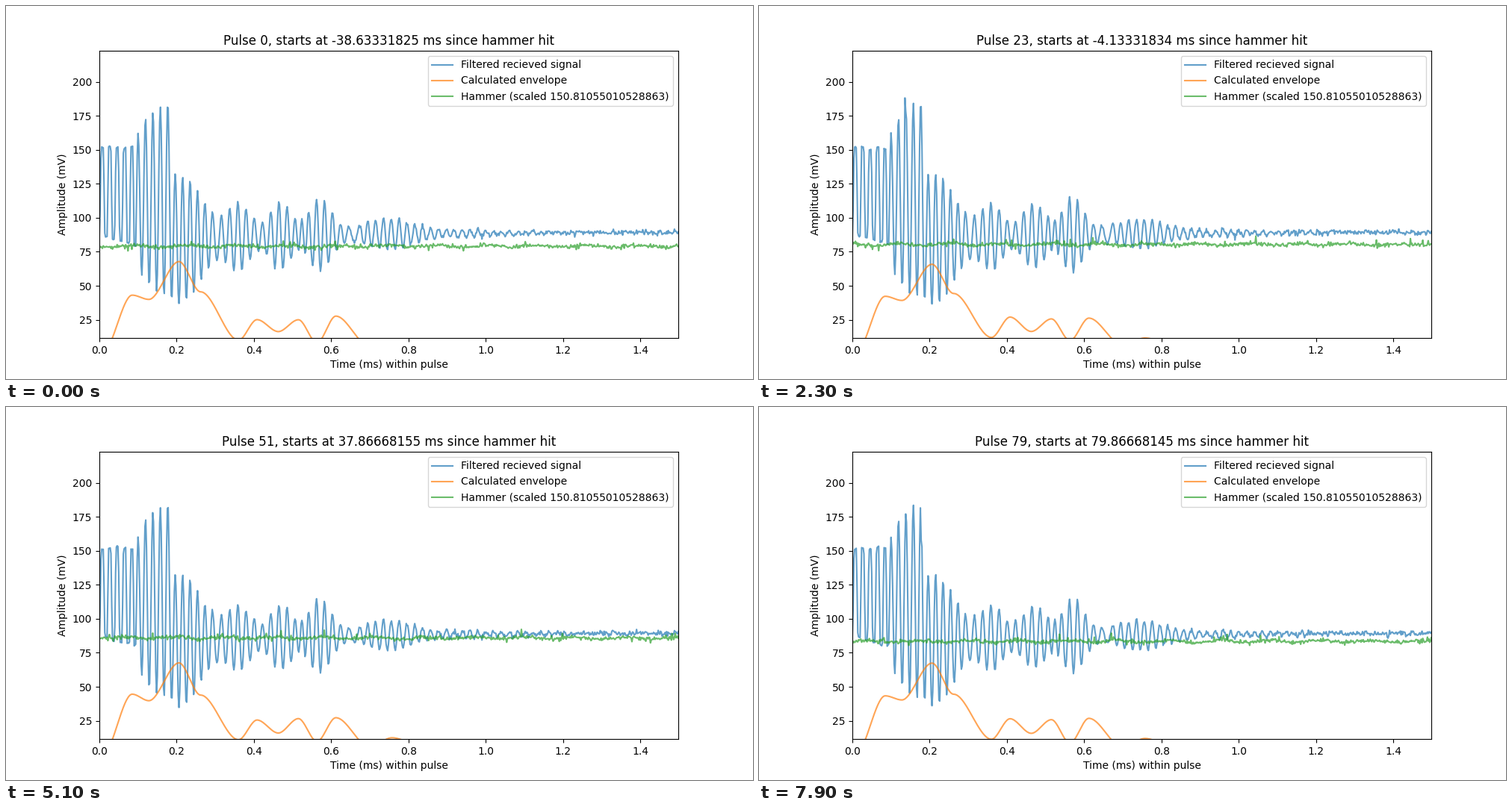
Recreate the animation shown at these times as a matplotlib script. Size 1000 by 500 pixels, loop 8 s.

```python
import numpy as np
import matplotlib.pyplot as plt
from matplotlib.animation import FuncAnimation

PULSES = 80
t = np.arange(750) * 0.002

# Carrier timing: (time in ms, cycle count); the rate is even in between
CARRIER = [(0, -5.39), (.0845, -1), (.1, 0), (.2925, 10), (.316, 11),
           (.507, 20), (.541, 22), (.645, 27), (.674, 28), (.857, 37), (1.5, 68.5)]
SENT, RELEASED = .094, .187

# Echoes in the received signal: (time, width, half swing in mV)
ECHOES = [(.205, .062, 49), (.363, .030, 23), (.468, .030, 24.5),
          (.571, .030, 27), (.740, .065, 10.5), (.950, .150, 2.2)]

# Turning points of the envelope: (time, mV)
TURNS = [(.008, 0), (.085, 43.8), (.128, 40.2), (.206, 67.3), (.262, 44), (.36, 11),
         (.408, 26), (.463, 16), (.515, 26), (.563, 9), (.612, 27), (.7, 5),
         (.757, 11.6), (.85, 3), (1.5, 3)]

cycle = np.interp(t, *zip(*CARRIER))
carrier = np.cos(2 * np.pi * cycle)
common = np.random.default_rng(7).normal(0, .7, t.size)


def start_time(n):
    return round(-38.633318254 + n * (1.5 - 3.8e-9), 8)


def ease_through(x, y):
    """Smoothstep from each turning point to the next."""
    i = np.clip(np.searchsorted(x, t, side="right") - 1, 0, len(x) - 2)
    s = np.clip((t - x[i]) / (x[i + 1] - x[i]), 0, 1)
    return y[i] + (y[i + 1] - y[i]) * s * s * (3 - 2 * s)


def envelope(n):
    x, y = np.array(TURNS).T
    return ease_through(x, y + np.random.default_rng(500 + n).normal(0, .8, y.size))


def received(n):
    rng = np.random.default_rng(n)
    wobble = np.interp(cycle, np.arange(-6, 70), rng.normal(0, 1, 76))

    # clipped drive, then a growing swing, then echoes dying away
    low = 88 - 90 * t
    drive = low + (152 - low) * (1 + np.clip(1.8 * carrier, -1, 1)) / 2
    growth = 113 + (75 - 27 * np.exp((.1 - t) / .035)) * carrier
    swing = sum(a * np.exp(-((t - c) / w) ** 2 / 2) for c, w, a in ECHOES)
    echoes = 89.5 - 5.5 * np.exp((RELEASED - t) / .4) + swing * carrier

    wave = np.select([t < SENT, t < RELEASED], [drive, growth], echoes)
    wave += wobble * np.clip(1.3 - t, .2, 1) * carrier
    wave += np.clip(t, .4, 1) * (common + rng.normal(0, .7, t.size))
    wave += 3.2 * np.exp(-((start_time(n) - 6.4) / 6) ** 2)
    if rng.random() < .4:
        wave[rng.integers(20, 90)] += rng.uniform(-30, 50)
    return wave


def hammer(n):
    rng = np.random.default_rng(1000 + n)
    since = start_time(n) + t
    after = np.maximum(since, 0)
    ring = 15 * np.exp(-after / 6) * np.cos(1.1 * after)
    level = np.where(since < 0, 80.5 + .035 * since,
                     83.4 + 19.4 * np.exp(-(after / 27) ** 2) + ring)
    ripple = .7 * np.sin(2 * np.pi * (t / .13 + rng.random()))
    spikes = (rng.random(t.size) < .08) * rng.uniform(-3, 4, t.size)
    return level + ripple + spikes + rng.normal(0, .7, t.size)


fig, ax = plt.subplots(figsize=(10, 5), dpi=100)
signals = [(received, "Filtered recieved signal"),
           (envelope, "Calculated envelope"),
           (hammer, "Hammer (scaled 150.81055010528863)")]
lines = [ax.plot(t, f(0), alpha=.7, label=name)[0] for f, name in signals]
ax.set_xlim(0, t[-1])
ax.set_ylim(11.6, 222.9)
ax.set_xlabel("Time (ms) within pulse")
ax.set_ylabel("Amplitude (mV)")
ax.legend(loc="upper right")
title = ax.set_title("")


def draw(n):
    for line, (f, _) in zip(lines, signals):
        line.set_ydata(f(n))
    title.set_text(f"Pulse {n}, starts at {start_time(n)} ms since hammer hit")
    return [*lines, title]


anim = FuncAnimation(fig, draw, frames=PULSES, interval=100, repeat=True,
                     repeat_delay=0, blit=False)
plt.show()
```
